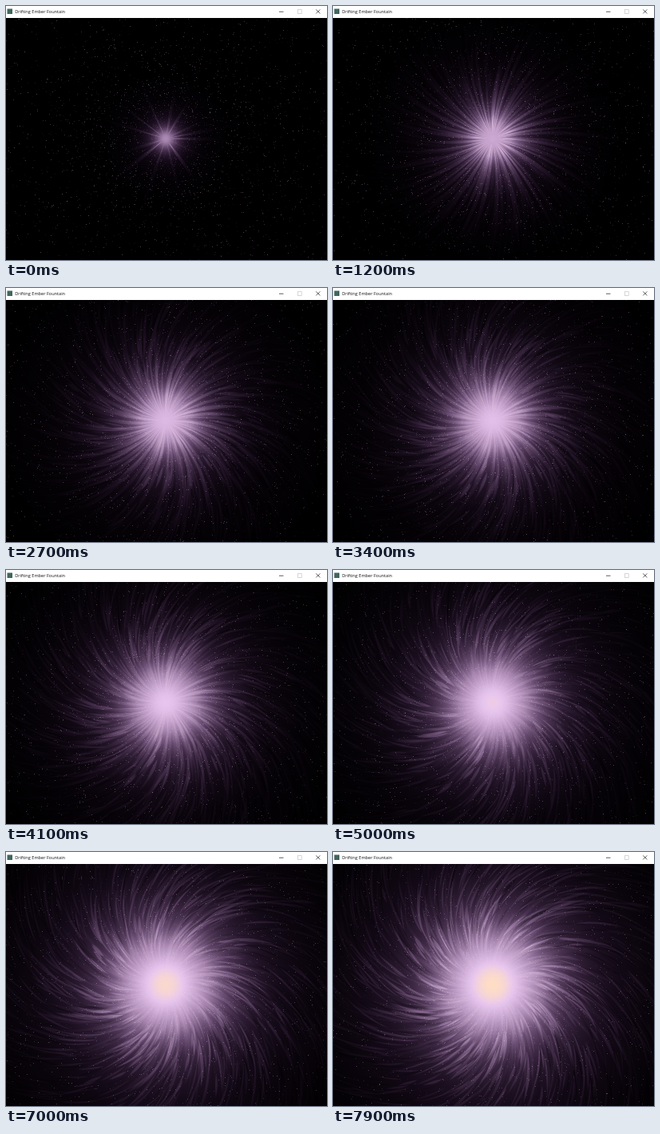
An HTML page with a canvas that plays this animation: 402x318 px, repeating every 8000 ms.

```html
<!DOCTYPE html>
<html lang="en">
<head>
<meta charset="utf-8">
<style>
html, body { margin: 0; width: 100%; height: 100%; overflow: hidden; background: #000; }
canvas, svg { position: absolute; left: 0; top: 0; display: block; }
text { font: 5.6px "Open Sans", "Noto Sans", sans-serif; fill: #111; }
</style>
</head>
<body>
<canvas id="stage" width="402" height="318"></canvas>
<svg width="402" height="15" viewBox="0 0 402 15">
  <rect width="402" height="15" fill="#fff"/>
  <rect x="1.5" y="3.5" width="6.5" height="6.5" fill="#42655f"/>
  <text x="11.3" y="9.2">Drifting Ember Fountain</text>
  <g fill="none" stroke="#333" stroke-width=".8">
    <path d="M342 7.2h5.5M388.3 4.4l5 5m0-5l-5 5"/>
    <rect x="365.4" y="4.6" width="4.8" height="4.8" stroke="#ccc"/>
  </g>
</svg>
<script>
const W = 402, H = 318, CX = 200, CY = 166, EDGE = 260, LOOP = 8000, STEP = 100;
const view = document.getElementById('stage').getContext('2d');
const buffer = document.createElement('canvas');
buffer.width = W;
buffer.height = H;
const ctx = buffer.getContext('2d');

let seed = 7321;
const rnd = () => {
  seed = (seed * 1664525 + 1013904223) >>> 0;
  return seed / 4294967296;
};
const between = (a, b) => a + (b - a) * rnd();
const make = (count, build) => Array.from({ length: count }, (_, i) => build(i));
const clamp = v => Math.max(0, Math.min(1, v));
const mix = (a, b, f) => a + (b - a) * f;

// Glow strength: a bell that widens and brightens with time.
function glowAt(r, t) {
  const age = t * 1000 / LOOP;
  const peak = mix(.7, 1, age ** .5), spread = mix(17, 80, age ** .65);
  return clamp(peak / (1 + (r / spread) ** 2.2) - .03 * r / EDGE);
}

// Black through lilac to pink, turning peach at full strength.
function tint(v) {
  const peach = clamp((v - .92) / .08);
  return `rgb(${[255 * v ** 1.13, 222 * v ** 1.35, 262 * v ** 1.07 - 66 * peach].map(Math.round)})`;
}

function radial(t, shape) {
  const g = ctx.createRadialGradient(CX, CY, 0, CX, CY, EDGE);
  for (let i = 0; i <= 40; i++) {
    const p = (i / 40) ** 1.5;
    g.addColorStop(p, tint(shape(glowAt(p * EDGE, t))));
  }
  return g;
}

const spokes = make(80, i => ({
  angle: i * 2.4 + between(0, .12), end: between(90, 230), half: between(.7, 2), alpha: between(.3, 1)
}));
const wisps = make(1300, i => ({
  angle: between(0, Math.PI * 2), phase: rnd(), speed: between(.03, .08), lean: between(1, 2),
  length: between(18, 60), half: between(.8, 2.1), dark: i % 3 === 0, alpha: between(.3, 1)
}));
const specks = make(4600, () => ({
  angle: between(0, Math.PI * 2), phase: rnd(), speed: between(.03, .12), alpha: .08 + rnd() ** 2 * .4,
  color: `hsl(${rnd() < .12 ? 38 : between(260, 310)}, 18%, 58%)`
}));

// A curved sliver, pointed at both ends, swept clockwise with distance.
function sliver(angle, r0, r1, half, twist) {
  const n = 7;
  ctx.beginPath();
  for (let i = 0; i <= 2 * n; i++) {
    const p = (i <= n ? i : 2 * n - i) / n, side = i <= n ? 1 : -1;
    const r = mix(r0, r1, p);
    const a = angle + twist * (r - r0) + side * half / r * Math.sin(Math.PI * p);
    ctx.lineTo(CX + r * Math.cos(a), CY + r * Math.sin(a));
  }
  ctx.fill();
}

function draw(ms) {
  const t = ms / 1000, twist = .0001 + .0038 * (1 - Math.exp(-t / 2.9));
  const bright = radial(t, v => Math.max(v, Math.min(.93, v * 1.55)));

  ctx.globalAlpha = 1;
  ctx.fillStyle = radial(t, v => v * mix(.5, 1, clamp(v * 1.5)));
  ctx.fillRect(0, 0, W, H);

  ctx.fillStyle = bright;
  const reach = mix(.6, 1, clamp(t / 1.2)), strength = mix(.75, .15, clamp(t / 5));
  spokes.forEach((s, i) => {
    ctx.globalAlpha = s.alpha * strength * clamp(14 + t * 55 - i);
    sliver(s.angle, 6, s.end * reach, s.half * 1.4, twist);
  });

  const density = clamp(.1 + t / 2.6);
  for (const w of wisps) {
    const p = (w.phase + w.speed * t) % 1, r = 14 + 235 * p ** .75;
    ctx.globalAlpha = w.alpha * density * (w.dark ? .3 : .6) * clamp(Math.min(p, 1 - p) * 8);
    if (w.dark) ctx.globalAlpha *= clamp((r - 30) / 60);
    ctx.fillStyle = w.dark ? '#000' : bright;
    sliver(w.angle + twist * r, r, r + w.length, w.half, twist * w.lean);
  }

  view.globalAlpha = 1;
  view.fillStyle = '#000';
  view.fillRect(0, 0, W, H);
  view.filter = 'blur(0.5px)';
  view.drawImage(buffer, 0, 0);
  view.filter = 'none';

  view.globalCompositeOperation = 'screen';
  for (const s of specks) {
    const r = 12 + 290 * ((s.phase + s.speed * t) % 1) ** 1.15, a = s.angle + twist * r;
    view.globalAlpha = s.alpha * clamp(r / 60);
    view.fillStyle = s.color;
    view.fillRect(Math.round(CX + r * Math.cos(a)), Math.round(CY + r * Math.sin(a)), 1, 1);
  }
  view.globalCompositeOperation = 'source-over';
}

const start = performance.now();
let shown = -1;
function tick() {
  const ms = Math.floor(((performance.now() - start) % LOOP) / STEP) * STEP;
  if (ms !== shown) draw(shown = ms);
  requestAnimationFrame(tick);
}
tick();
</script>
</body>
</html>
```
